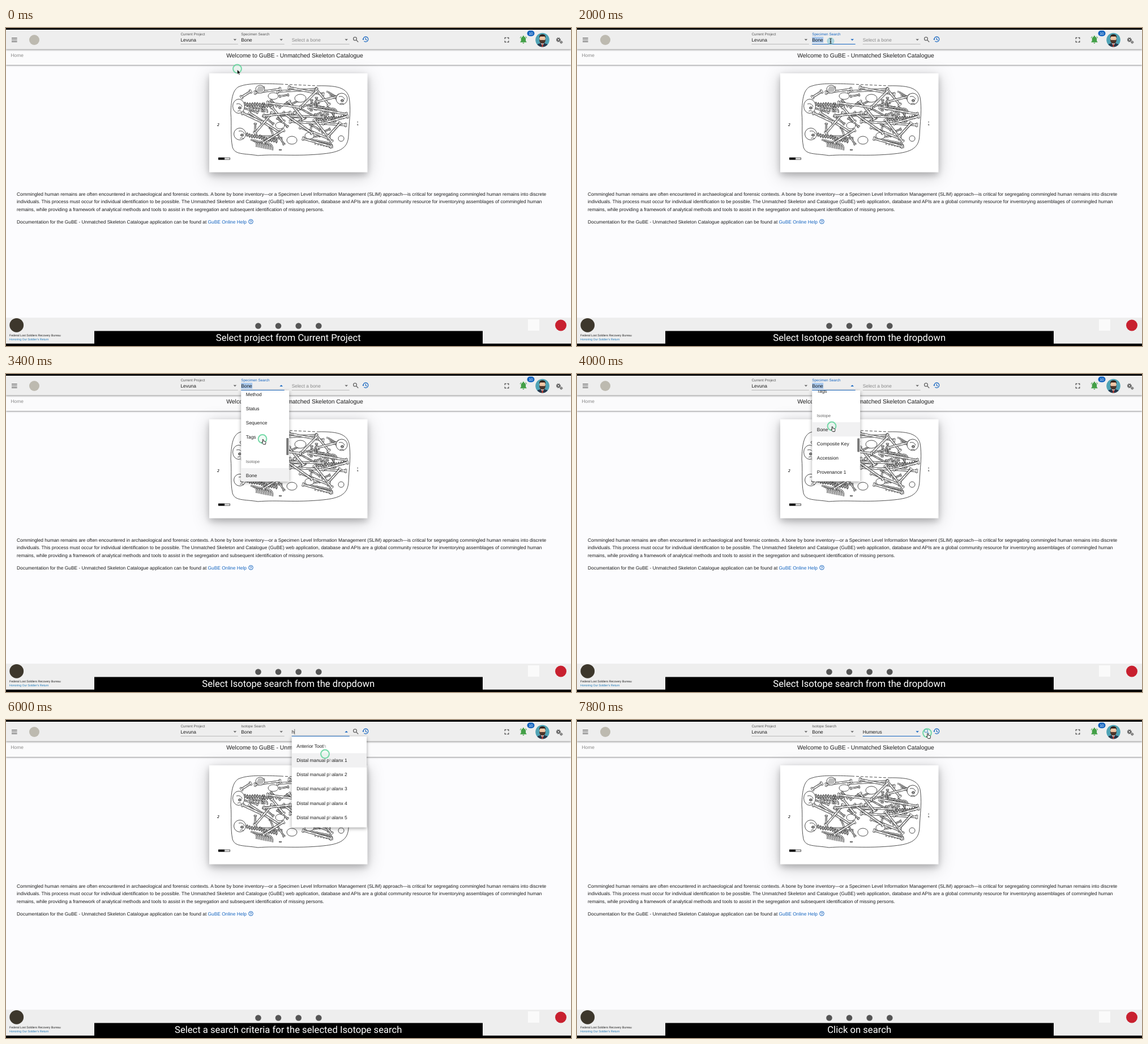
These frames come from a looping animation (998x561 px, 8000 ms). An HTML page:

```html
<!DOCTYPE html>
<html lang="en">
<head>
<meta charset="utf-8">
<title>Specimen search walkthrough</title>
<style>
html, body { margin: 0; width: 100%; height: 100%; overflow: hidden; background: #000; }
svg { display: block; width: 100vw; height: 100vh; }
text { font-family: "Liberation Sans", Arial, sans-serif; font-size: 8.39px; fill: #1c1c1c; text-rendering: geometricPrecision; white-space: pre; }
.label { font-size: 6.4px; }
.title { font-size: 10.42px; }
.tiny { font-size: 5.2px; }
#caption { font: 16.65px Roboto, sans-serif; fill: #fff; }
.bar { filter: drop-shadow(0 1px 1.5px rgba(0,0,0,.45)); }
.card { filter: drop-shadow(0 5px 6px rgba(0,0,0,.2)) drop-shadow(0 5px 14px rgba(0,0,0,.22)); }
.menu { filter: drop-shadow(0 2px 3px rgba(0,0,0,.35)); }
.ink { fill: none; stroke: #222; stroke-width: .8; }
</style>
</head>
<body>
<svg viewBox="0 0 998 561" preserveAspectRatio="none">
  <defs>
    <clipPath id="menuClip"><rect id="menuBox" y="29" /></clipPath>
    <clipPath id="rowClip"><rect id="rowBox" height="25.16" /></clipPath>
    <clipPath id="face"><circle cx="947.5" cy="21" r="12.3" /></clipPath>
  </defs>
  <rect width="998" height="561" />
  <rect y="3" width="998" height="553.5" fill="#fcfcfe" />
  <rect class="bar" y="38" width="998" height="27" fill="#fbfbfc" />
  <rect class="bar" y="3" width="998" height="34.5" fill="#eee" />

  <path d="M10 17.8h9.6M10 21h9.6M10 24.2h9.6" stroke="#555" stroke-width="1.2" />
  <circle cx="50" cy="21" r="9" fill="#bdbab0" />
  <path d="M881.2 19.6v-2.4h2.4M885.4 17.2h2.4v2.4M887.8 22.4v2.4h-2.4M883.6 24.8h-2.4v-2.4" fill="none" stroke="#444" stroke-width="1.2" />
  <path d="M908.3 25.3v-.8l1.4-1.4v-3.8q0-3 3-4v-.5a1.2 1.2 0 0 1 2.4 0v.5q3 1 3 4v3.8l1.4 1.4v.8zM912.5 26h2.8a1.4 1.4 0 0 1-2.8 0z" fill="#43a047" />
  <path d="M908.3 18q.2-2 1.8-3.3M919.5 18q-.2-2-1.8-3.3" fill="none" stroke="#43a047" />
  <rect x="920.5" y="4.5" width="13" height="10" rx="5" fill="#1565c0" />
  <text x="927" y="12" text-anchor="middle" class="label" style="fill:#fff">10</text>
  <g clip-path="url(#face)">
    <rect x="935" y="8" width="25" height="26" fill="#4fa3b5" />
    <path d="M936 35q0-7 8-8h7q8 1 8 8z" fill="#26374a" />
    <path d="M944.5 26.5h6l-3 5z" fill="#fff" />
    <path d="M946.8 28h1.4l.7 6h-2.8z" fill="#c0392b" />
    <rect x="942.4" y="12.5" width="10.2" height="13" rx="5" fill="#f1c6a5" />
    <path d="M942 19.5l1.3 1.7h8.4l1.3-1.7q.3 8-5.5 8t-5.5-8z" fill="#4b352b" />
    <path d="M942 18q-1-7 5.5-7t5.5 7l-1.3-3h-8.2z" fill="#33251f" />
  </g>
  <g fill="none" stroke="#505050">
    <circle cx="975.8" cy="20.8" r="2.1" stroke-width="1.6" />
    <circle cx="975.8" cy="20.8" r="3.5" stroke-width="1.1" stroke-dasharray="1.7 1.05" />
    <circle cx="980.8" cy="25" r="1.3" stroke-width="1.1" />
    <circle cx="980.8" cy="25" r="2.3" stroke-width=".8" stroke-dasharray="1 .8" />
  </g>
  <g id="lens" fill="none" stroke-width="1.3"><circle cx="616.5" cy="19" r="2.9" /><path d="M618.7 21.2l3.5 3.5" /></g>
  <g fill="none" stroke="#1565c0" stroke-width="1.2"><path d="M631 19.7a4.4 4.4 0 1 1 1.4 3.4M635.3 17.3v2.8l2.1 1.3" /><path d="M629.2 19.3h3.6l-1.8 2.1z" fill="#1565c0" stroke="none" /></g>

  <text x="8.5" y="51" style="fill:#888">Home</text>
  <text class="title" x="510" y="52" text-anchor="middle">Welcome to GuBE - Unmatched Skeleton Catalogue</text>

  <rect class="card" x="359" y="80" width="279.5" height="174.5" fill="#fff" />
  <g id="plan"></g>

  <text x="19" y="296">Commingled human remains are often encountered in archaeological and forensic contexts. A bone by bone inventory—or a Specimen Level Information Management (SLIM) approach—is critical for segregating commingled human remains into discrete</text>
  <text x="19" y="309.4">individuals. This process must occur for individual identification to be possible. The Unmatched Skeleton and Catalogue (GuBE) web application, database and APIs are a global community resource for inventorying assemblages of commingled human</text>
  <text x="19" y="322.8">remains, while providing a framework of analytical methods and tools to assist in the segregation and subsequent identification of missing persons.</text>
  <text x="19" y="344.7">Documentation for the GuBE - Unmatched Skeleton Catalogue application can be found at <tspan fill="#1565c0">GuBE Online Help</tspan></text>
  <circle cx="432.5" cy="341.5" r="3.8" fill="none" stroke="#1565c0" />
  <text class="label" x="432.5" y="343.8" text-anchor="middle" style="fill:#1565c0;font-weight:bold">?</text>

  <rect y="511" width="998" height="45.5" fill="#eee" />
  <circle cx="18.7" cy="524.3" r="12.4" fill="#3d372c" />
  <text class="tiny" x="6" y="543.8">Federal Lost Soldiers Recovery Bureau</text>
  <text class="tiny" x="6" y="551" style="fill:#1976b8">Honoring Our Soldier's Return</text>
  <g fill="#555"><circle cx="445.5" cy="525.5" r="5.3" /><circle cx="481" cy="525.5" r="5.3" /><circle cx="516.7" cy="525.5" r="5.3" /><circle cx="552.3" cy="525.5" r="5.3" /></g>
  <rect x="922" y="514" width="20" height="20" fill="#fafafa" />
  <circle cx="980" cy="524.5" r="10" fill="#c8202f" />
  <rect x="156" y="534.5" width="686" height="26.5" />
  <text id="caption" x="498.7" y="551.7" text-anchor="middle"></text>

  <g id="fields"></g>
  <g id="menu"></g>
  <g id="pointer"></g>
</svg>
<script>
const LOOP = 8000, STEP = 200, ROW = 25.16, TOP = 29, BLUE = '#1565c0';
const $ = id => document.getElementById(id);

// Value of the last [time, value] entry that has started
const pick = (t, list) => list.filter(e => e[0] <= t).pop()[1];

// Linear blend between [time, ...values] keys
function blend(t, keys) {
  const i = keys.findIndex(k => k[0] > t);
  if (i < 0) return keys[keys.length - 1].slice(1);
  const a = keys[i - 1], b = keys[i], f = (t - a[0]) / (b[0] - a[0]);
  return a.slice(1).map((v, n) => v + (b[n + 1] - v) * f);
}

/* ---- burial plan ---- */
function drawPlan() {
  let seed = 11, out = '';
  const rnd = () => (seed = seed * 16807 % 2147483647) / 2147483647;
  const ink = (d, extra = '') => out += `<path class="ink" d="${d}" ${extra}/>`;
  const oval = (x, y, rx, ry, fill = '#fff') => out += `<ellipse class="ink" cx="${x}" cy="${y}" rx="${rx}" ry="${ry}" style="fill:${fill}"/>`;

  function bone(x1, y1, x2, y2, w) {
    const len = Math.hypot(x2 - x1, y2 - y1), nx = -(y2 - y1) / len * w * .5, ny = (x2 - x1) / len * w * .5;
    for (const [x, y] of [[x1, y1], [x2, y2]])
      for (const s of [-1, 1]) oval(x + nx * s, y + ny * s, w * .55, w * .55);
    const d = `M${x1} ${y1}L${x2} ${y2}`;
    ink(d, `style="stroke-width:${w + .8}"`);
    ink(d, `style="stroke:#fff;stroke-width:${w - .8};stroke-linecap:round"`);
    ink(d, 'style="stroke-width:.4" stroke-dasharray="9 5"');
  }
  function ribs(x, y, n, dx, dy, r) {
    for (let i = 0; i < n; i++) {
      const d = `M${x + i * dx} ${y + i * dy}q${r} ${r * .2} ${r * .8} ${r}`;
      ink(d, 'style="stroke-width:2.6"');
      ink(d, 'style="stroke:#fff;stroke-width:1.1"');
    }
  }
  function spine(x, y, n, dx, dy) {
    for (let i = 0; i < n; i++) {
      const cx = x + i * dx, cy = y + i * dy + Math.sin(i) * .8;
      out += `<rect class="ink" x="${cx - 1.6}" y="${cy - 2.4}" width="3.4" height="4.8" rx="1" style="fill:#fff"/>`;
      ink(`M${cx} ${cy - 4}v8`);
    }
  }

  ink('M485 99C460 98 430 97 416 102C400 105 398 125 397 150C399 170 396 190 400 210C404 224 420 221 445 225C480 222 510 227 560 222C590 219 604 212 605 190C606 165 609 150 607 130C606 107 590 101 550 102');
  ink('M485 99L550 102', 'stroke-dasharray="5 3"');

  for (let i = 0; i < 34; i++) {
    const a = rnd() * 6.283, q = Math.sqrt(rnd()), x = 506 + Math.cos(a) * q * 82, y = 158 + Math.sin(a) * q * 44;
    const b = rnd() * 3.14, l = 5 + rnd() * 9;
    bone(x - Math.cos(b) * l, y - Math.sin(b) * l, x + Math.cos(b) * l, y + Math.sin(b) * l, 2.3);
  }
  ribs(424, 137, 7, 5, .6, 9);
  ribs(432, 197, 8, 4, .8, 13);
  ribs(551, 139, 6, 5, .5, 10);
  ribs(538, 196, 7, 5, 1, 10);
  ribs(566, 112, 5, 3.5, 2, 9);
  spine(422, 134, 12, 4.4, .3);
  spine(426, 188, 13, 4.3, 1);
  spine(548, 161, 12, 4.4, -.3);
  oval(505, 198, 9, 7); oval(520, 124, 10, 7); oval(472, 120, 9, 6); oval(484, 172, 8, 6); oval(536, 190, 8, 6);

  const longs = [
    [480, 112, 548, 108], [500, 105, 560, 117], [548, 108, 570, 135], [510, 150, 548, 112],
    [430, 150, 482, 184], [440, 185, 470, 150], [470, 140, 490, 165], [418, 150, 452, 166],
    [455, 202, 490, 180], [500, 155, 560, 157], [502, 165, 600, 171], [520, 175, 570, 195],
    [535, 140, 601, 152], [550, 130, 588, 120], [490, 150, 540, 185], [545, 162, 575, 200],
    [432, 112, 416, 122], [440, 114, 484, 108], [500, 130, 525, 160], [560, 168, 603, 156],
    [456, 155, 502, 150], [525, 195, 574, 209], [462, 132, 520, 140], [570, 190, 590, 168]];
  longs.forEach(b => bone(...b, 3.4));

  oval(411, 138, 10.5, 12.5); oval(413, 187, 10.5, 10.5); oval(593, 125, 10, 10);
  for (const [x, y] of [[413, 141], [417, 189], [594, 128]]) {
    oval(x, y, 2.6, 2, '#999');
    ink(`M${x - 6} ${y - 7}q8-2 10 5M${x - 4} ${y + 6}q4-3 7 1`);
  }
  oval(449, 108, 8, 7);
  for (let i = -5; i < 7; i += 2) ink(`M${449 + i - 2} 113l5-10`, 'style="stroke-width:.6"');
  oval(592, 195, 5, 5);
  ink('M482 215q2-2 5 0q-2 2-5 0');
  out += '<rect class="ink" x="375.5" y="229" width="20" height="3"/><rect x="375" y="228.7" width="11" height="3.6"/>';
  out += '<text x="373" y="173" style="font:italic bold 7.5px \'Liberation Serif\',serif">2</text><text x="620" y="167" style="font-size:4.5px">x<tspan x="620" dy="5">6</tspan></text>';
  $('plan').innerHTML = out;
}

/* ---- menu contents ---- */
const projects = ['Fort Ellimore', 'Lake Drennan', 'Harbor Candle', 'XMF', 'Dölvern Forest', 'Roccaverdolino', 'Levuna', 'Bavro Ossuary', 'Nyaltuvia', 'Port Hasvel'];
const base = ['Bone', 'Composite Key', 'Accession', 'Provenance 1', 'Provenance 2'];
const groups = [
  ['Specimen', ...base, 'Individual', 'Group', 'External Id', 'Tags'],
  ['DNA', ...base, 'Sample Number', 'Lab', 'Method', 'Status', 'Sequence', 'Tags'],
  ['Isotope', ...base, 'Sample Number', 'Lab', 'Batch', 'Status', 'Tags']];
const bones = {
  '': ['Anterior Tooth', 'Atlas', 'Axis', 'Calcaneus', 'Capitate', 'Clavicle', 'Coccyx'],
  h: ['Anterior Tooth', ...[1, 2, 3, 4, 5].map(n => 'Distal manual phalanx ' + n), 'Distal pedal phalanx 1'],
  hu: ['Humerus'], hum: ['Humerus']
};
const plainRows = list => list.map((text, i) => ({ text, y: 17 + i * ROW }));
function groupRows() {
  let y = 17;
  return groups.flatMap(g => {
    const rows = g.map((text, i) => ({ text, head: !i, y: y + i * ROW }));
    y += g.length * ROW + 17;
    return rows;
  });
}
const searchRows = groupRows();

function mark(text, typed) {
  const i = typed ? text.toLowerCase().indexOf(typed) : -1, n = i + (typed || '').length;
  return i < 0 ? text : `${text.slice(0, i)}<tspan fill="#999">${text.slice(i, n)}</tspan>${text.slice(n)}`;
}

function drawMenu(m, ripple) {
  if (!m) return $('menu').innerHTML = '';
  const { x, w, rows, scroll = 0, active, tint = '#f1f1f2', typed, thumb } = m;
  const h = Math.min(160.5, rows.length * ROW + 9);
  const box = $('menuBox');
  box.setAttribute('x', x); box.setAttribute('width', w); box.setAttribute('height', h);
  let out = `<rect class="menu" x="${x}" y="${TOP}" width="${w}" height="${h}" fill="#fff"/><g clip-path="url(#menuClip)">`;
  rows.forEach((r, i) => {
    const y = TOP + r.y - scroll;
    if (i === active) {
      out += `<rect x="${x}" y="${y - ROW / 2}" width="${w}" height="${ROW}" fill="${tint}"/>`;
      if (ripple) {
        const row = $('rowBox');
        row.setAttribute('x', x); row.setAttribute('y', y - ROW / 2); row.setAttribute('width', w);
        out += `<circle clip-path="url(#rowClip)" cx="${ripple[0]}" cy="${ripple[1]}" r="23" fill="${tint === '#f1f1f2' ? '#dcdcdc' : '#afcbea'}"/>`;
      }
    }
    const color = r.head ? '#666' : tint !== '#f1f1f2' && i === active ? BLUE : '#1c1c1c';
    out += `<text x="${x + 8.6}" y="${y + 3}" style="fill:${color}${r.head ? ';font-size:7.4px' : ''}">${mark(r.text, typed)}</text>`;
  });
  if (thumb) out += `<rect x="${x + w - 5}" y="${thumb[0]}" width="4" height="${thumb[1]}" rx="1" fill="#777"/>`;
  $('menu').innerHTML = out + '</g>';
}

/* ---- input fields ---- */
function field({ x, w, label = '', text, hint, active, open, selected }) {
  const end = x + w, ax = end - 5.5, c = active ? BLUE : '#666', s = open ? -1 : 1;
  return `<text class="label" x="${x}" y="12.6" style="fill:${active ? BLUE : '#555'}">${label}</text>` +
    (selected ? `<rect x="${x}" y="15.5" width="${selected}" height="10.5" fill="#a9c9ee"/>` : '') +
    `<text x="${x}" y="23.7" style="fill:${hint ? '#888' : '#1c1c1c'}">${text}</text>` +
    `<path d="M${ax - 2.8} ${20.7 - s * 1.3}h5.6l-2.8 ${s * 2.8}z" fill="${c}"/>` +
    `<path d="M${x} 28.5H${end}" stroke="${active ? BLUE : '#999'}" stroke-width="${active ? 1.2 : .6}"/>`;
}

const shapes = {
  none: '',
  arrow: '<path d="M0 1.5v8l1.9-1.7 1.3 2.9 1.3-.6-1.3-2.8h2.6z" fill="#000" stroke="#fff" stroke-width=".5"/>',
  hand: '<path d="M.2 1q1-.8 1.5.3l.5 2.6 3 .8q1 .4.8 1.5l-.7 3.4H1.6L-1.4 6q.4-1.2 2 .2z" fill="#fff" stroke="#111" stroke-width=".9"/>',
  beam: '<path d="M-1.7-4.4q1.7 0 1.7 1.2v6.4q0 1.2-1.7 1.2M1.7-4.4Q0-4.4 0-3.2M0 3.2q0 1.2 1.7 1.2M-1 .8h2" fill="none" stroke="#111" stroke-width=".9"/>'
};

function render(t) {
  const within = (a, b) => t >= a && t < b;
  const [px, py] = blend(t, [
    [0, 408.5, 72], [400, 365, 24], [800, 365, 24], [1000, 370, 120], [1200, 371, 136], [1400, 371, 136],
    [1800, 448, 22], [2200, 448, 24], [2600, 454, 122], [3200, 454, 122], [4000, 450, 92], [4400, 450, 92],
    [4800, 586.5, 17.5], [5200, 583, 19], [5600, 563.5, 60], [6400, 563.5, 60], [6600, 545, 48], [7000, 545, 46],
    [7400, 612, 24], [7600, 618.5, 23], [8000, 618.5, 23]]);
  const shape = pick(t, [[0, 'arrow'], [400, 'beam'], [1000, 'hand'], [1600, 'arrow'], [1800, 'beam'], [2400, 'hand'], [4600, 'beam'],
    [5200, 'hand'], [5800, 'none'], [6600, 'hand'], [7200, 'arrow'], [7400, 'hand']]);
  const press = [600, 1200, 2000, 4200, 5000, 6800].includes(t);

  $('caption').textContent = pick(t, [[0, 'Select project from Current Project'], [1600, 'Select Isotope search from the dropdown'],
    [4400, 'Select a search criteria for the selected Isotope search'], [7000, 'Click on search']]);

  const projectOpen = within(800, 1400), searchOpen = within(2200, 4400), boneOpen = within(5200, 7000);
  const typed = pick(t, [[0, ''], [5800, 'h'], [6200, 'hu'], [6400, 'hum']]);
  const projectOn = within(600, 1800), searchOn = within(2000, 5000), boneOn = t >= 5000, done = t >= 7000;
  $('fields').innerHTML =
    field({ x: 308.4, w: 101.5, label: 'Current Project', text: 'Levuna', active: projectOn, open: projectOpen, selected: projectOn && 27.5 }) +
    field({ x: 415.2, w: 76.5, label: t < 4400 ? 'Specimen Search' : 'Isotope Search', text: 'Bone', active: searchOn, open: searchOpen, selected: searchOn && 20 }) +
    field({ x: 504.7, w: 102, text: done ? 'Humerus' : typed || 'Select a bone', hint: !done && !typed, active: boneOn, open: boneOpen }) +
    (boneOpen && typed ? `<path d="M${505.2 + [4.6, 9.3, 16.3][typed.length - 1]} 16v9.5" stroke="#222" stroke-width=".6"/>` : '');
  $('lens').setAttribute('stroke', t >= 7400 ? BLUE : '#666');

  const [scroll, top, size] = blend(t, [[0, 0, 30, 47], [2400, 0, 30, 47], [2800, 258, 105, 47], [3400, 480, 113, 30], [3800, 561, 113.5, 24], [8000, 561, 113.5, 24]]);
  let menu = null;
  if (projectOpen) menu = { x: 308, w: 118, rows: plainRows(projects), scroll: 66, active: 6, tint: '#cfe0f3' };
  if (searchOpen) menu = { x: 415.2, w: 85, rows: searchRows, scroll, active: pick(t, [[0, 1], [2800, 11], [3400, 23]]), thumb: [top, size] };
  if (boneOpen) menu = { x: 504.7, w: 132.3, rows: plainRows(bones[typed]), active: t < 5600 ? -1 : typed.length > 1 ? 0 : 1, typed };
  drawMenu(menu, press && [px, py]);

  const ring = press
    ? '<circle r="6" fill="#7cc3d8" fill-opacity=".55" stroke="#7cc8c4" stroke-opacity=".6"/>'
    : '<circle r="7.4" fill="#dff5e8" fill-opacity=".45" stroke="#5fd39a" stroke-width="2" stroke-opacity=".85"/>';
  $('pointer').innerHTML = `<g transform="translate(${px} ${py})">${ring}${shapes[shape]}</g>`;
}

drawPlan();
let last = -1;
const start = performance.now();
function tick() {
  const t = Math.floor((performance.now() - start) % LOOP / STEP) * STEP;
  if (t !== last) render(last = t);
  requestAnimationFrame(tick);
}
tick();
</script>
</body>
</html>
```
